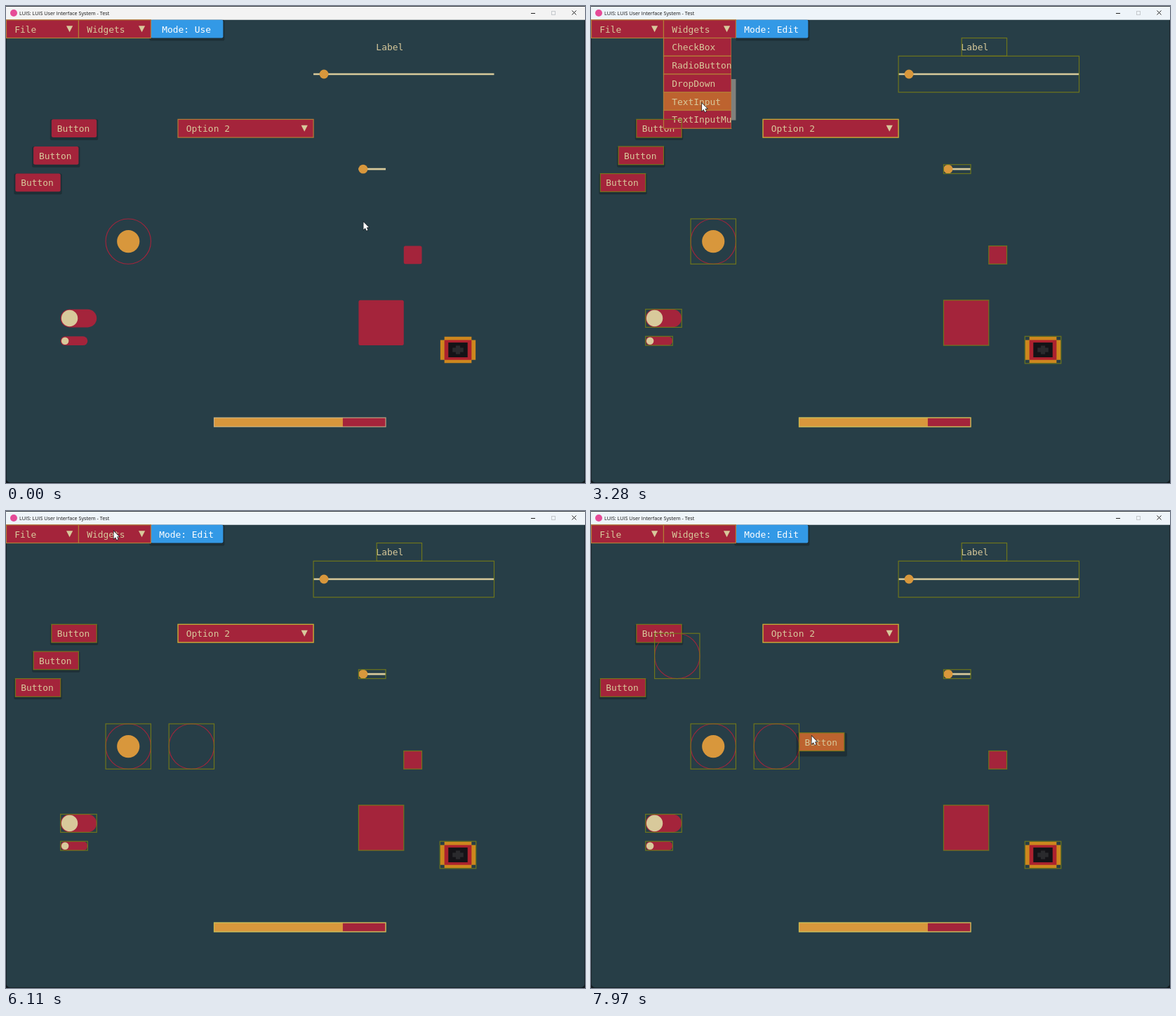
An HTML page with a canvas that plays this animation: 825 px wide and 679 px high, repeating every 8 s.

```html
<!DOCTYPE html>
<html lang="en">
<head>
<meta charset="utf-8">
<title>LUIS</title>
<style>
html, body { margin: 0; width: 100%; height: 100%; overflow: hidden; background: #273e47; }
canvas { display: block; }
</style>
</head>
<body>
<canvas id="stage" width="825" height="679"></canvas>
<script>
const ctx = document.getElementById('stage').getContext('2d');
const LOOP = 8000, TICK = 77.2, FIRST_TICK = 165;
const BG = '#273e47', RED = '#a4243b', GOLD = '#d8973c', CREAM = '#d8c99b', HOVER = '#bd632f';
const EDGE = '#b47d37', FRAME = 'rgba(118,124,24,.9)', BRIGHT_FRAME = 'rgba(205,188,56,.75)';
const MONO = '12.9px "DejaVu Sans Mono", monospace';
const ITEMS = ['Label', 'Icon', 'Button', 'Slider', 'Switch', 'CheckBox', 'RadioButton',
  'DropDown', 'TextInput', 'TextInputMultiLine', 'ProgressBar'];

// Every widget sits on a grid of square cells below the title bar.
const U = 12.87;
const gx = col => .5 + U * col;
const gy = row => 19.8 + U * row;
const at = (col, row) => ({ col, row });
const menuRow = n => at(12.2, 3.5 + 2 * n);

// Times of the clicks
const EDIT = 1000, OPEN = 1775, PICK = 4245, GRAB_RADIO = 4810, DROP_RADIO = 5420,
  REOPEN = 6270, PICK_AGAIN = 6885, GRAB_BUTTON = 7350;

// The pointer eases to each stop and waits there for the next move.
const START = at(39.5, 22.3);
const move = (from, until, stop) => ({ from, until, stop });
const MOVES = [
  move(100, EDIT, at(20.24, .56)),
  move(1260, 1860, at(11.85, 1.1)),
  move(2040, 2270, menuRow(-.35)),
  move(2390, 2580, menuRow(.7)),
  move(3000, 3370, menuRow(3.5)),
  move(3560, 4010, at(13.95, 7.6)),
  move(4440, GRAB_RADIO, at(9.5, 15.2)),
  move(GRAB_RADIO, 5110, at(26.5, 28.2)),
  move(5110, DROP_RADIO, at(20.55, 24.18)),
  move(DROP_RADIO, 6100, at(11.85, .64)),
  move(REOPEN, 6720, at(12.55, 7.55)),
  move(PICK_AGAIN, GRAB_BUTTON, at(4.4, 14.3)),
  move(GRAB_BUTTON, 7660, at(25.4, 19.4)),
  move(7660, 7960, at(24.36, 23.32))
];

const tickTime = t => FIRST_TICK + TICK * Math.floor((t - FIRST_TICK) / TICK);
const ease = k => k * k * (3 - 2 * k);

function pointerAt(t) {
  let { col, row } = START;
  for (const { from, until, stop } of MOVES) {
    if (t <= from) break;
    const k = ease(Math.min(1, (t - from) / (until - from)));
    col += (stop.col - col) * k;
    row += (stop.row - row) * k;
  }
  return at(col, row);
}

function dragged(home, grabTime, t) {
  if (t < grabTime) return home;
  const a = pointerAt(grabTime), b = pointerAt(t);
  return at(home.col + Math.round(b.col - a.col), home.row + Math.round(b.row - a.row));
}

const over = (p, col, row, w, h) => p.col >= col && p.col < col + w && p.row >= row && p.row < row + h;

function box(x, y, w, h, color, r = 0) {
  ctx.fillStyle = color;
  ctx.beginPath();
  ctx.roundRect(x, y, w, h, r);
  ctx.fill();
}

const cells = (col, row, w, h, color, r) => box(gx(col), gy(row), w * U, h * U, color, r);

function frame(col, row, w, h, color = FRAME) {
  ctx.strokeStyle = color;
  ctx.lineWidth = 1.2;
  ctx.strokeRect(gx(col), gy(row), w * U, h * U);
}

function disc(x, y, r, color) {
  ctx.fillStyle = color;
  ctx.beginPath();
  ctx.arc(x, y, r, 0, 7);
  ctx.fill();
}

function poly(points, fill, stroke) {
  ctx.beginPath();
  points.forEach(([x, y]) => ctx.lineTo(x, y));
  ctx.closePath();
  if (stroke) {
    ctx.strokeStyle = stroke;
    ctx.lineWidth = 1.4;
    ctx.stroke();
  }
  ctx.fillStyle = fill;
  ctx.fill();
}

function segment(x1, y1, x2, y2) {
  ctx.strokeStyle = '#222';
  ctx.lineWidth = 1;
  ctx.beginPath();
  ctx.moveTo(x1, y1);
  ctx.lineTo(x2, y2);
  ctx.stroke();
}

function text(str, x, row, color = CREAM, align = 'left') {
  ctx.font = MONO;
  ctx.fillStyle = color;
  ctx.textAlign = align;
  ctx.fillText(str, x, gy(row) + 4.9);
}

function shadow(col, row, w, h, raised) {
  const grow = raised ? 4 : 2;
  box(gx(col) - grow, gy(row), w * U + grow * 2, h * U + grow * 2, 'rgba(0,0,0,.24)', 2);
}

function button({ col, row }, hot, corner) {
  shadow(col, row, 5, 2, hot);
  cells(col, row, 5, 2, hot ? HOVER : RED, corner);
  text('Button', gx(col + 2.5) - 1, row + 1, CREAM, 'center');
}

function dropDown(label, col, row, w) {
  cells(col, row, w, 2, RED);
  frame(col, row, w, 2, EDGE);
  text(label, gx(col) + 11.8, row + 1);
  const x = gx(col + w - 1), y = gy(row + 1) - 4.4;
  poly([[x - 4.6, y], [x + 4.6, y], [x, y + 9]], CREAM);
}

function slider(col, row, w, value) {
  box(gx(col), gy(row) - 1.3, w * U, 2.6, CREAM);
  disc(gx(col + .5 + value * (w - 1)), gy(row), U / 2, GOLD);
}

function radio({ col, row }, checked) {
  const x = gx(col + 2.5), y = gy(row + 2.5);
  ctx.strokeStyle = RED;
  ctx.lineWidth = 1.1;
  ctx.beginPath();
  ctx.arc(x, y, 2.5 * U, 0, 7);
  ctx.stroke();
  if (checked) disc(x, y, 1.25 * U, GOLD);
}

function toggle(col, row, w, h) {
  cells(col, row, w, h, RED, h * U / 2);
  disc(gx(col + h / 2), gy(row + h / 2), h * U / 2 - 1.2, CREAM);
}

function decoratedBox(col, row) {
  const layer = (dx, dy, color) =>
    box(gx(col) + dx, gy(row) + dy, 4 * U - 2 * dx, 3 * U - 2 * dy, color);
  layer(6.4, .6, '#cd871e');
  layer(.6, 5.2, '#cd871e');
  layer(6.4, 5.2, '#ac222e');
  layer(12, 8.8, '#141317');
  layer(18, 16.2, '#2a2a2d');
  layer(22.6, 13.2, '#2a2a2d');
}

function titleBar(active) {
  box(0, 1, 825, 18.8, active ? '#eef4f9' : '#f3f3f3');
  disc(11, 10, 5, '#e64b97');
  ctx.font = '7.2px "Open Sans", sans-serif';
  ctx.fillStyle = '#111';
  ctx.textAlign = 'left';
  ctx.fillText('LUIS: LUIS User Interface System - Test', 19, 12.8);
  segment(748, 10.5, 754, 10.5);
  ctx.strokeStyle = '#c4c8cc';
  ctx.strokeRect(777.5, 7.5, 5, 5);
  segment(806.5, 6.5, 812.5, 12.5);
  segment(806.5, 12.5, 812.5, 6.5);
}

function menu(col, scroll, pointer) {
  const w = 7.5;
  for (let i = 0; i < 5; i++) {
    const row = 2 + 2 * i;
    cells(col, row, w, 2, over(pointer, col, row, w, 2) ? HOVER : RED);
    frame(col, row, w, 2, EDGE);
    ctx.save();
    ctx.beginPath();
    ctx.rect(gx(col), gy(row), w * U, 2 * U);
    ctx.clip();
    text(ITEMS[i + scroll], gx(col) + 11.8, row + 1);
    ctx.restore();
  }
  const unit = 10 / ITEMS.length;
  cells(col + w, 2, .5, 10, BG);
  cells(col + w, 2 + scroll * unit, .5, 5 * unit, '#80807c');
}

function arrow({ col, row }) {
  ctx.save();
  ctx.translate(gx(col) + .6, gy(row) + .6);
  poly([[0, 0], [0, 10.8], [2.5, 8.6], [4.2, 12.4], [6, 11.6], [4.3, 7.9], [7.4, 7.6]], '#fff', '#1c2428');
  ctx.restore();
}

function editFrames(buttons, radios) {
  frame(41, 2, 5, 2);
  frame(34, 4, 20, 4);
  frame(39, 16, 3, 1);
  frame(6, 32, 4, 2);
  frame(6, 35, 3, 1);
  frame(44, 25, 2, 2);
  frame(39, 31, 5, 5);
  frame(48, 35, 4, 3);
  frame(19, 11, 15, 2, BRIGHT_FRAME);
  frame(23, 44, 19, 1, BRIGHT_FRAME);
  for (const { col, row } of buttons) frame(col, row, 5, 2);
  for (const { col, row } of radios) frame(col, row, 5, 5);
}

function draw(t) {
  const p = pointerAt(t);
  const edit = t >= EDIT;
  const open = (t >= OPEN && t < PICK) || (t >= REOPEN && t < PICK_AGAIN);
  const scroll = t < 3125 ? 6 : t < 3285 ? 5 : 4;
  const corner = edit ? 0 : 2.5;

  const radios = [at(11, 22)];
  if (t >= PICK) radios.push(dragged(at(7, 13), GRAB_RADIO, Math.min(t, DROP_RADIO)));
  if (t >= PICK_AGAIN) radios.push(at(7, 12));
  const held = t >= GRAB_BUTTON && dragged(at(3, 14), GRAB_BUTTON, t);
  const buttons = [at(5, 11), held || at(3, 14), at(1, 17)];

  box(0, 0, 825, 679, '#10181c');
  box(.7, 0, 823.6, 678.3, BG, [0, 0, 5, 5]);
  box(0, 0, 825, 1, '#3a4044');
  titleBar(edit);

  text('Label', gx(41) - .8, 3);
  slider(34, 6, 20, .035);
  slider(39, 16.5, 3, 0);
  dropDown('Option 2', 19, 11, 15);
  for (const b of buttons) {
    if (b !== held) button(b, !open && !held && over(p, b.col, b.row, 5, 2), corner);
  }
  radios.forEach((r, i) => radio(r, i === 0));
  toggle(6, 32, 4, 2);
  toggle(6, 35, 3, 1);
  cells(44, 25, 2, 2, RED, corner);
  cells(39, 31, 5, 5, RED, corner);
  decoratedBox(48, 35);
  cells(23, 44, 19, 1, RED);
  cells(23, 44, 19 * .75, 1, GOLD);
  frame(23, 44, 19, 1, 'rgba(216,201,155,.75)');
  if (held) button(held, true, corner);

  const modeHot = over(p, 16, 0, 8, 2);
  shadow(16, 0, 8, 2, modeHot);
  cells(16, 0, 8, 2, modeHot ? '#56bef2' : '#3399e6', 2);
  text(edit ? 'Mode: Edit' : 'Mode: Use', gx(20) - .8, 1, '#fff', 'center');
  dropDown('File', 0, 0, 8);
  dropDown('Widgets', 8, 0, 8);
  if (open) menu(8, scroll, p);
  if (edit) editFrames(buttons, radios);
  arrow(p);
}

function animate(now) {
  draw(tickTime(now % LOOP));
  requestAnimationFrame(animate);
}
draw(0);
requestAnimationFrame(animate);
</script>
</body>
</html>
```
